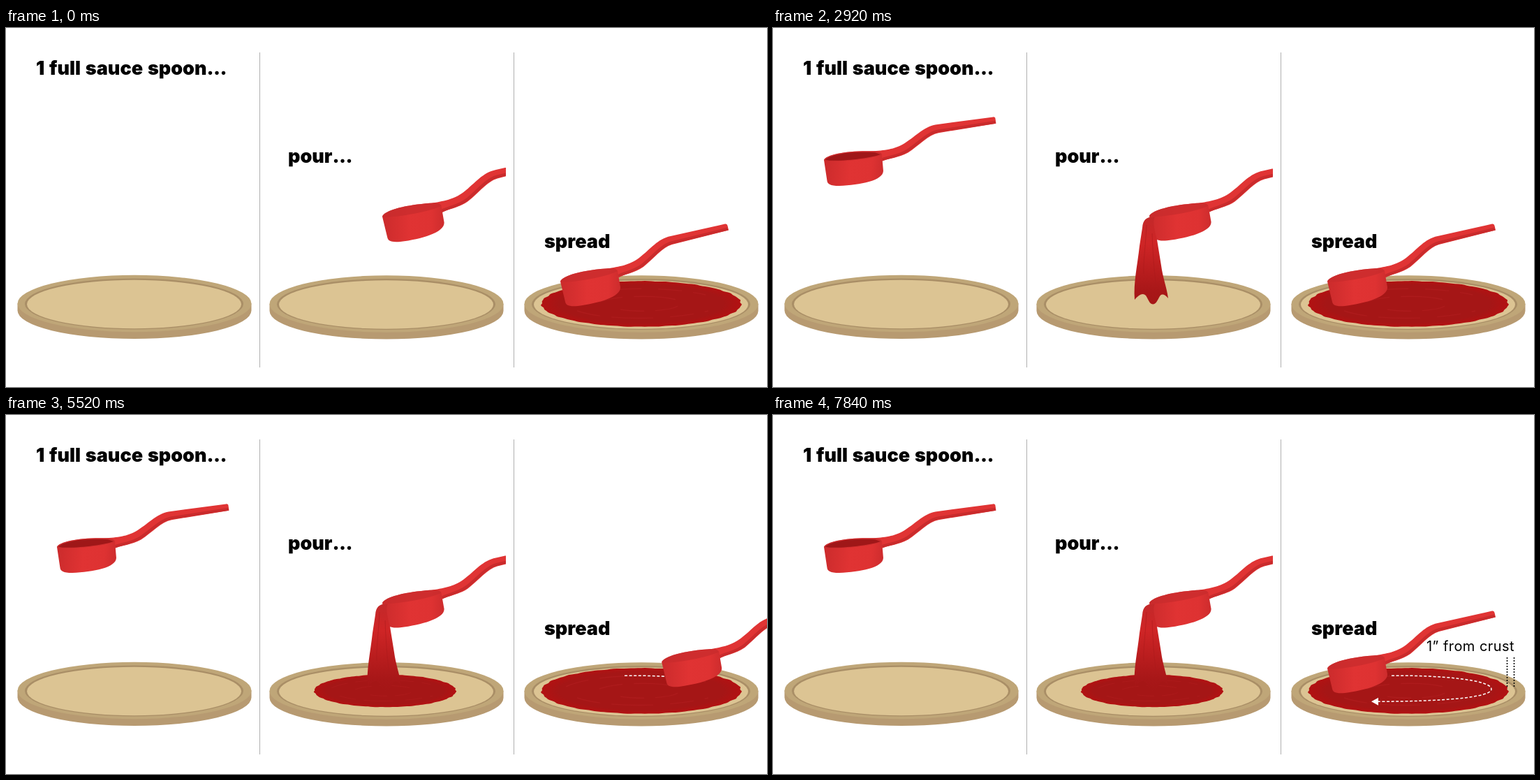
Animation of 1090x514 px, one loop 8000 ms. Source, as an HTML page:

```html
<!DOCTYPE html>
<html lang="en">
<head>
<meta charset="utf-8">
<title>Sauce the pizza</title>
<style>
  html, body { margin: 0; width: 100%; height: 100%; overflow: hidden; background: #fff; }
  svg { display: block; width: 100%; height: 100%; }
  text { font: 900 27px Inter, "Open Sans", sans-serif; font-feature-settings: "calt" 0; word-spacing: 1.5px; }
  .dots { letter-spacing: -.6px; }
  .note { font-weight: 400; font-size: 20px; letter-spacing: .45px; word-spacing: 0; }
</style>
</head>
<body>
<svg viewBox="0 0 1090 514">
  <defs>
    <linearGradient id="cupFill">
      <stop offset="0" stop-color="#cb2b2c"/>
      <stop offset=".45" stop-color="#e03333"/>
      <stop offset=".8" stop-color="#de3232"/>
      <stop offset="1" stop-color="#cd2c2d"/>
    </linearGradient>
    <linearGradient id="pourFill" x2="0" y2="1">
      <stop offset="0" stop-color="#c3292a"/>
      <stop offset=".3" stop-color="#cf2526"/>
      <stop offset=".85" stop-color="#a81718"/>
      <stop offset="1" stop-color="#a51616"/>
    </linearGradient>
    <radialGradient id="sauceFill">
      <stop offset=".82" stop-color="#a51616"/>
      <stop offset="1" stop-color="#b31112"/>
    </radialGradient>
    <clipPath id="middlePanel"><path d="M364 0H716V514H364z"/></clipPath>

    <g id="plate">
      <path d="M16.5 394.5V404.5A167.5 40.5 0 0 0 351.5 404.5V394.5z" fill="#b79a71"/>
      <ellipse cx="184" cy="394.5" rx="167.5" ry="40.7" fill="#bfa678"/>
      <ellipse cx="183.5" cy="395" rx="156.5" ry="36.5" fill="#a98e66"/>
      <ellipse cx="183.5" cy="395.5" rx="153.5" ry="34.7" fill="#dcc493"/>
    </g>

    <g id="sauce">
      <path id="sauceEdge" fill="url(#sauceFill)"/>
      <path d="M-108 -6C-70 -24 30 -27 92 -13M-92 10C-50 24 40 24 96 10M-60 -3C-30 -14 40 -13 62 -2M-30 8C0 13 44 9 52 3"
            fill="none" stroke="#ad1b1c" stroke-width="1.4" stroke-dasharray="34 16 60 24"/>
    </g>

    <!-- Origin is the pouring lip at the left of the rim -->
    <g id="spoon">
      <path d="M66 -18C86 -22 98 -23 113 -34C130 -47 139 -61 158 -65L236 -82.5Q239 -83 239.5 -80L241 -73.5L160 -53C146 -49 134 -33 119 -21C106 -12 92 -11 82 -5z" fill="#e03434"/>
      <path d="M83 -8C92 -13 105 -14 118 -24C132 -35 144 -51 159 -55.5L240 -75.5" fill="none" stroke="#c92b2c" stroke-width="4"/>
      <path d="M0 0C2 -8 32 -17 72 -19Q80 -19 82 -15L86 8C87 22 55 31 25 35C12 36 8 34 7 29z" fill="url(#cupFill)"/>
      <path d="M0 0C2 -8 32 -17 72 -19Q80 -19 82 -15C68 -7 14 3 0 0z" fill="#c92b2c" fill-opacity=".75"/>
    </g>
  </defs>

  <path d="M363.5 35V486M727.5 35V486" stroke="#b0b0b0"/>
  <use href="#plate"/>
  <use href="#plate" x="361" y=".5"/>
  <use href="#plate" x="726" y=".5"/>
  <text x="43" y="66.5">1 full sauce spoon<tspan class="dots">...</tspan></text>
  <text x="404" y="192.5">pour<tspan class="dots">...</tspan></text>
  <text x="771" y="314.5">spread</text>

  <g id="fullSpoon">
    <g transform="translate(73 189) rotate(5)">
      <use href="#spoon"/>
      <path d="M2 -.5C8 -8 36 -16 72 -17L80 -15C66 -8 16 2 2 -.5z" fill="#9f1718"/>
    </g>
  </g>

  <use id="puddle" href="#sauce"/>
  <g clip-path="url(#middlePanel)"><use id="pourSpoon" href="#spoon"/></g>
  <g id="pour">
    <path d="M529 286C530 274 535 270 547 270.5C543 276 547 291 550 303L556 340C558 356 564 372 566 387Q558 378 554 384C550 391 549 395 544 395.5C539 395 538 389 534 383Q528 377 518 389C516 365 522 340 525 312z" fill="url(#pourFill)"/>
    <path d="M535 282C534 310 530 335 531 352M543 294C544 322 546 350 549 372" fill="none" stroke="#a91b1c" stroke-opacity=".55"/>
  </g>

  <use href="#sauce" x="910" y="395"/>
  <mask id="trail" maskUnits="userSpaceOnUse" x="840" y="360" width="220" height="60">
    <path id="reveal" pathLength="1" stroke-dasharray="1 2" fill="none" stroke="#fff" stroke-width="8"/>
  </mask>
  <path id="arc" d="M886 373.2C955 372.5 1029 379 1029 392.5C1029 405 955 410 867 410.3"
        mask="url(#trail)" fill="none" stroke="#fff" stroke-width="1.5" stroke-dasharray="4 2.6"/>
  <path id="arrow" d="M857 410.3L867 404.8V415.8z" fill="#fff"/>
  <use id="spreadSpoon" href="#spoon"/>

  <g id="note">
    <path d="M1051.5 347V390M1061.5 347V390" stroke="#000" stroke-width="1.5" stroke-dasharray="2 2"/>
    <text class="note" x="936" y="338">1” from crust</text>
  </g>
</svg>
<script>
const LOOP = 8000;
const el = id => document.getElementById(id);
const set = (id, name, value) => el(id).setAttribute(name, value);
const progress = (t, from, to) => Math.min(1, Math.max(0, (t - from) / (to - from)));
const easeOut = (p, power = 3) => 1 - (1 - p) ** power;

// Time, x and y offset of the spreading spoon
const sweep = [
  [4850, 0, 0], [5100, 36, -10], [5320, 92, -13], [5520, 145, -9], [5690, 161, 0],
  [5820, 139, 18], [5960, 89, 30], [6040, 58, 31.5], [6180, 8, 27], [6350, -25, 14],
  [6480, -15, 5], [6800, 0, 0]
];

function slope(i, axis) {
  const before = sweep[i - 1], after = sweep[i + 1];
  return before && after ? (after[axis] - before[axis]) / (after[0] - before[0]) : 0;
}

function sweepAt(t, axis) {
  const last = sweep.length - 1;
  if (t <= sweep[0][0] || t >= sweep[last][0]) return 0;
  const i = sweep.findIndex(key => key[0] > t) - 1;
  const a = sweep[i], b = sweep[i + 1], span = b[0] - a[0];
  const u = (t - a[0]) / span, v = 1 - u;
  return v * v * (1 + 2 * u) * a[axis] + u * u * (3 - 2 * u) * b[axis]
    + span * u * v * (v * slope(i, axis) - u * slope(i + 1, axis));
}

function wobblyEllipse(rx, ry, count = 180) {
  const points = Array.from({ length: count }, (_, i) => {
    const a = i / count * Math.PI * 2;
    const r = 1 + .005 * Math.sin(23 * a) + .004 * Math.sin(37 * a + 1);
    return `${(rx * r * Math.cos(a)).toFixed(1)} ${(ry * r * Math.sin(a)).toFixed(1)}`;
  });
  return `M${points.join("L")}z`;
}

function fadeSlide(id, p, dx, dy) {
  const rest = 1 - easeOut(p);
  set(id, "opacity", p);
  set(id, "transform", `translate(${dx * rest} ${dy * rest})`);
}

function draw(t) {
  fadeSlide("fullSpoon", progress(t, 560, 1280), 36, 20);

  const squash = t < 2320 ? 1 : .97;
  set("pourSpoon", "transform",
    `translate(0 ${250 * (1 - squash)}) scale(1 ${squash}) translate(539 270) scale(1.03)`);
  const fall = progress(t, 2280, 2900);
  set("pour", "transform", `translate(0 ${270 * (1 - fall)}) scale(1 ${fall})`);
  const spread = .71 * easeOut(progress(t, 2920, 3960), 2.4);
  set("puddle", "transform", `translate(543 395) scale(${spread})`);

  set("spreadSpoon", "transform",
    `translate(${794 + sweepAt(t, 1)} ${363 + sweepAt(t, 2)})`);
  const trail = progress(t, 5160, 6140);
  set("reveal", "stroke-dashoffset", 1 - trail);
  set("arc", "visibility", trail ? "visible" : "hidden");
  set("arrow", "visibility", trail < 1 ? "hidden" : "visible");

  fadeSlide("note", progress(t, 6920, 7760), -16, 0);
}

set("sauceEdge", "d", wobblyEllipse(143, 32.7));
set("reveal", "d", el("arc").getAttribute("d"));

function tick() {
  draw(performance.now() % LOOP);
  requestAnimationFrame(tick);
}
tick();
</script>
</body>
</html>
```
